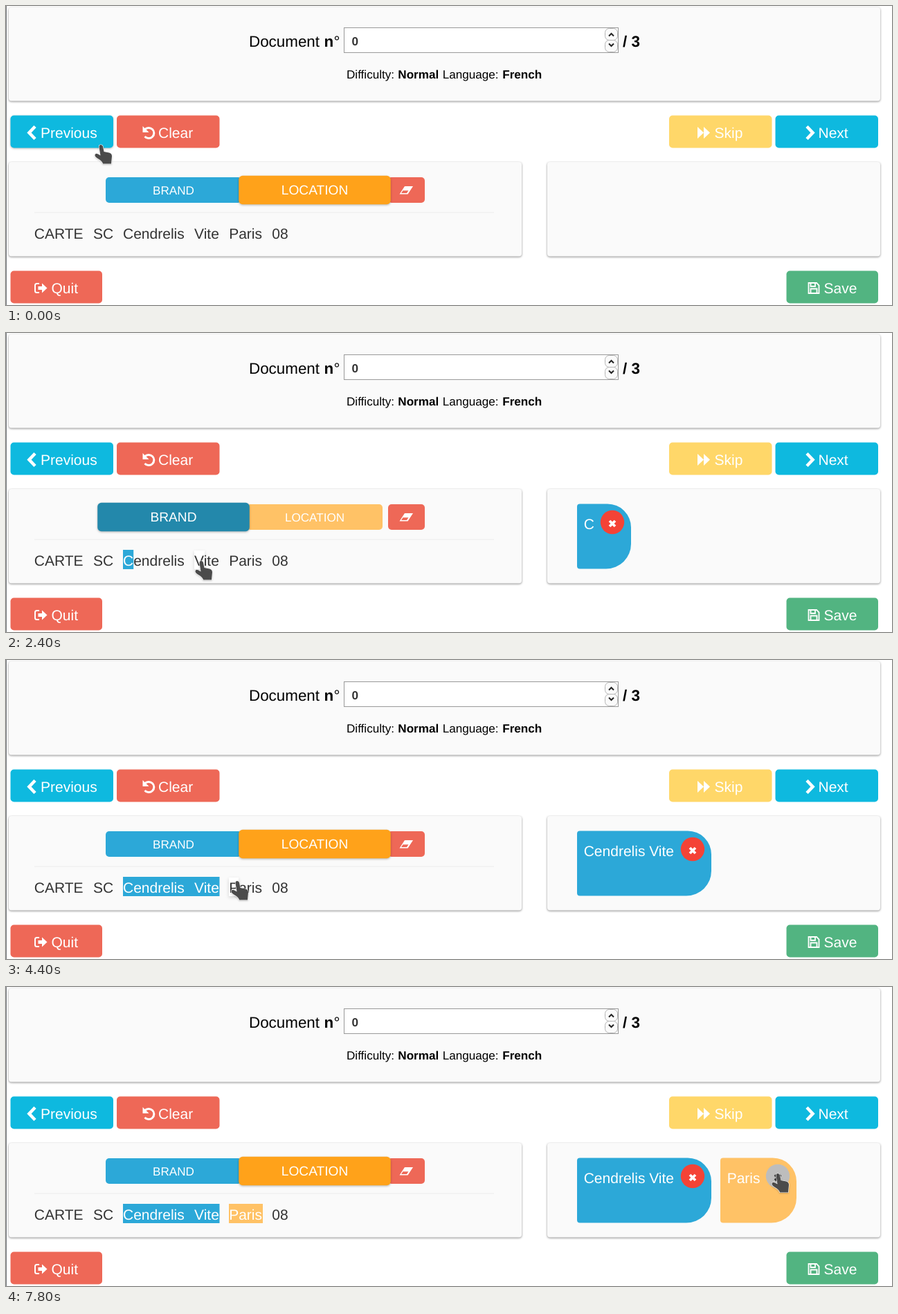
An HTML page that plays this animation: 1280 px wide and 433 px high, repeating every 8 s.

```html
<!DOCTYPE html>
<html lang="en">
<head>
<meta charset="utf-8">
<title>Document labelling</title>
<style>
  html, body { margin: 0; width: 100%; height: 100%; overflow: hidden; background: #fff; }
  svg { display: block; width: 100%; height: 100%; font-family: "Liberation Sans", Arial, sans-serif; }
  text { font-size: 21px; fill: #333; white-space: pre; text-rendering: geometricPrecision; }
  .panel { fill: #fafafa; filter: drop-shadow(0 1.5px 1.5px rgba(0,0,0,.45)); }
  .raised { filter: drop-shadow(0 1px 1.5px rgba(0,0,0,.28)); }
  .hover { fill: #fff; filter: drop-shadow(0 2px 2.5px rgba(0,0,0,.16)); }
  .head text { fill: #000; }
  .title { font-size: 22.4px; }
  .head .small { font-size: 17.1px; }
  .head .value { fill: #333; }
  .b { font-weight: bold; }
  .light text, .light path { fill: #fff; }
  .light .line { fill: none; stroke: #fff; }
  .light .red { fill: #ee6857; }
  .tab { font-size: 17.1px; fill: #fff; text-anchor: middle; }
  .cyan { fill: #0eb9df; }
  .yellow { fill: #ffd769; }
  .green { fill: #52b481; }
  .pointer { fill: #4b4b4b; stroke: #fff; stroke-width: 1.2; paint-order: stroke; stroke-linejoin: round;
    filter: drop-shadow(0 1px 1px rgba(0,0,0,.2)); }
</style>
</head>
<body>
<svg viewBox="0 0 1280 433" preserveAspectRatio="none">
  <rect width="1" height="433" fill="#777b80"/>
  <rect class="panel" x="4" y="2" width="1259" height="135.5" rx="4"/>
  <rect class="panel" x="4" y="226" width="741" height="136.5" rx="4"/>
  <rect class="panel" x="782" y="226" width="481" height="136.5" rx="4"/>

  <g class="head">
    <text class="title" x="351" y="59">Document</text>
    <text class="title b" x="459.6" y="59">n</text>
    <text class="title" x="473.6" y="59">°</text>
    <rect x="488.5" y="31.5" width="396" height="36" fill="#fff" stroke="#999"/>
    <text class="small b value" x="499.5" y="57">0</text>
    <g fill="#fafafa" stroke="#b5b5b5">
      <rect x="865.5" y="32.5" width="18" height="17" rx="6"/>
      <rect x="865.5" y="49.5" width="18" height="17" rx="6"/>
    </g>
    <path d="M871 43.5l3.5-3.5 3.5 3.5M871 54.5l3.5 3.5 3.5-3.5" fill="none" stroke="#222" stroke-width="2"/>
    <text class="title b" x="891" y="59">/ 3</text>
    <text class="small" x="492" y="105">Difficulty:</text>
    <text class="small b" x="566.3" y="105">Normal</text>
    <text class="small" x="630.8" y="105">Language:</text>
    <text class="small b" x="717.2" y="105">French</text>
  </g>

  <g class="light">
    <rect id="previous" class="cyan" x="6.5" y="158.5" width="148.5" height="47" rx="5"/>
    <path class="line" d="M42 174.5l-8.5 9 8.5 9" stroke-width="4.6"/>
    <text x="50" y="190.8">Previous</text>

    <rect class="red" x="160" y="158.5" width="148.5" height="47" rx="5"/>
    <path class="line" d="M200.5 179A7.6 7.6 0 1 1 200.5 189" stroke-width="3"/>
    <path d="M197.5 174v9h9z"/>
    <text x="220" y="190.8">Clear</text>

    <rect class="yellow" x="958" y="158.5" width="148.5" height="47" rx="5"/>
    <path d="M999 175l9 8.5-9 8.5zM1008 175l9 8.5-9 8.5z"/>
    <text x="1023.5" y="190.8">Skip</text>

    <rect class="cyan" x="1111.5" y="158.5" width="148.5" height="47" rx="5"/>
    <path class="line" d="M1157 174.5l8.5 9-8.5 9" stroke-width="4.6"/>
    <text x="1173.5" y="190.8">Next</text>

    <rect class="red" x="6.5" y="383.5" width="132.5" height="47" rx="5"/>
    <path class="line" d="M48 402h-3.5q-2.5 0-2.5 2.5v8q0 2.5 2.5 2.5h3.5" stroke-width="2"/>
    <path d="M46.5 406h5.5v-4.5l7.5 7-7.5 7v-4.5h-5.5z"/>
    <text x="65.5" y="415.8">Quit</text>

    <rect class="green" x="1127.5" y="383.5" width="132.5" height="47" rx="5"/>
    <path class="line" d="M1159.5 401h11.5l3.5 3.5v11.5h-15zM1162.5 415.5v-6h9v6M1162.5 401.5v4.5h6.5v-4.5" stroke-width="1.8"/>
    <text x="1181.5" y="415.8">Save</text>

    <rect class="red" x="552" y="248" width="53" height="37" rx="5"/>
    <path d="M576 261h12l-7.5 11.5h-12z"/>
    <path class="red" d="M573.5 267.2h8l-2.5 3.8h-8z"/>
  </g>

  <g id="tabs"></g>
  <path d="M41 299h664" stroke="#ececec"/>

  <rect id="hover" class="hover" y="315" height="27"/>
  <rect id="markBrand" x="169" y="314" height="28" fill="#2ca8d8"/>
  <rect id="markPlace" x="322" y="314" height="28" fill="#ffc266"/>
  <g id="words"></g>
  <g id="chips"></g>

  <path id="hand" class="pointer" d="M6.5 4Q6.500 1 9 1T12 3.500L13.500 11 21 12.500Q25 13.500 25 17.500L24 28.500H12Q11 24.500 4 20.500 0 18 .5 15.500 1.500 12.500 5 14.500L8.500 16.500Z"/>
  <path id="arrow" class="pointer" d="M1 1V20L5.500 16 9 23.500 12.500 22 9 14.500H15Z"/>
</svg>
<script>
const LOOP = 8000, STEP = 100;
const $ = id => document.getElementById(id);
const SVG = "http://www.w3.org/2000/svg";
const clamp = v => Math.min(1, Math.max(0, v));
const ramp = (t, from, to) => clamp((t - from) / (to - from));
const show = (el, on) => el.setAttribute("visibility", on ? "visible" : "hidden");

function set(el, attrs) {
  for (const k in attrs) el.setAttribute(k, attrs[k]);
  return el;
}
function add(parent, name, attrs = {}, text = "") {
  const el = set(document.createElementNS(SVG, name), attrs);
  el.textContent = text;
  return parent.appendChild(el);
}
function mix(a, b, p) {
  return `rgb(${a.map((v, i) => Math.round(v + (b[i] - v) * p))})`;
}

// Pointer moves: start, end, left, top
const moves = [
  [0, 400, 185, 264], [700, 900, 139, 329], [1200, 1300, 169, 329],
  [1600, 1900, 168, 330], [2100, 2400, 273, 329], [2800, 3100, 291, 332],
  [3500, 3700, 400, 305], [3800, 3900, 439, 279], [3900, 4000, 436, 264],
  [4200, 4400, 325, 319], [4500, 4800, 324, 328], [4900, 5100, 346, 336],
  [5200, 5300, 357, 334], [5700, 5900, 467, 333], [6000, 6200, 849, 350],
  [6400, 6600, 890, 329], [6700, 7000, 1085, 246], [7100, 7300, 1106, 269]
];
function pointerAt(t) {
  let x = 128, y = 200;
  for (const [from, to, nx, ny] of moves) {
    const p = ramp(t, from, to);
    x += (nx - x) * p;
    y += (ny - y) * p;
  }
  return [x, y];
}

// Letter under the pointer: start, end, left, width
const hovers = [
  [900, 1300, 140, 15], [1300, 1400, 155, 13], [1400, 2100, 169, 15],
  [2400, 3000, 272, 15], [3000, 3400, 297, 12], [4400, 5000, 322, 14],
  [5300, 7800, 360, 11]
];

function makeTab(cx, label, idle, active) {
  const g = add($("tabs"), "g");
  const box = add(g, "rect", { x: -98, y: -18.5, width: 196, height: 37, rx: 5 });
  add(g, "text", { class: "tab", y: 6.2 }, label);
  return (p, lifted) => {
    set(g, { transform: `translate(${cx} 266.5) scale(${1 + .12 * p})` });
    set(box, { fill: mix(idle, active, p), class: p > 0 || lifted ? "raised" : "" });
    if (p > .5 && g !== g.parentNode.lastChild) g.parentNode.append(g);
  };
}
const brandTab = makeTab(242, "BRAND", [44, 168, 216], [35, 136, 171]);
const placeTab = makeTab(446, "LOCATION", [255, 194, 102], [255, 162, 26]);

function makeWord(x, word) {
  const el = add($("words"), "text", { x, y: 337 });
  const marked = add(el, "tspan", { fill: "#fff" });
  const plain = add(el, "tspan");
  return n => {
    marked.textContent = word.slice(0, n);
    plain.textContent = word.slice(n);
  };
}
makeWord(40.8, "CARTE")(0);
makeWord(126, "SC")(0);
const shopWord = makeWord(169, "Cendrelis");
const kindWord = makeWord(272, "Vite");
const cityWord = makeWord(322.2, "Paris");
makeWord(384.3, "08")(0);

function makeChip(x, fill) {
  const g = add($("chips"), "g");
  const body = add(g, "path", { fill });
  const label = add(g, "text", { x: x + 9.7, y: 284.2, style: "fill:#fff" });
  const button = add(g, "g");
  const disc = add(button, "circle", { r: 17.2 });
  const cross = add(button, "path", { d: "M-4-2L4 6M4-2L-4 6", "stroke-width": 3.8 });
  return (text, width, dim) => {
    show(g, text);
    if (!text) return;
    const r = x + width;
    set(body, { d: `M${x + 4} 247.5H${r - 34}A34 34 0 0 1 ${r} 281.5V305.5A36 36 0 0 1 ${r - 36} 341.5H${x + 4}Q${x} 341.5 ${x} 337.5V251.5Q${x} 247.5 ${x + 4} 247.5Z` });
    label.textContent = text;
    set(button, { transform: `translate(${r - 27} 274)` });
    set(disc, { fill: dim ? "#bdbdbd" : "#f44336" });
    set(cross, { stroke: dim ? "#333" : "#fff" });
  };
}
const brandChip = makeChip(825, "#2ca8d8");
const placeChip = makeChip(1032, "#ffc266");

function draw(t) {
  $("previous").setAttribute("class", t < 100 ? "cyan raised" : "cyan");

  const brandOn = ramp(t, 300, 600) - ramp(t, 4100, 4400);
  brandTab(brandOn);
  placeTab(1 - brandOn, t >= 3900 && t < 4200);

  const hover = hovers.find(([from, to]) => t >= from && t < to);
  show($("hover"), hover);
  if (hover) set($("hover"), { x: hover[2], width: hover[3] });

  const brandFirst = t >= 2100, brandAll = t >= 3400;
  set($("markBrand"), { width: brandAll ? 139.5 : brandFirst ? 15.2 : 0 });
  shopWord(brandAll ? 9 : +brandFirst);
  kindWord(brandAll ? 4 : 0);
  brandChip(brandAll ? "Cendrelis Vite" : brandFirst ? "C" : "", brandAll ? 194 : 78);

  const placeFirst = t >= 5000, placeAll = t >= 5800;
  set($("markPlace"), { width: placeAll ? 49 : placeFirst ? 14 : 0 });
  cityWord(placeAll ? 5 : +placeFirst);
  placeChip(placeAll ? "Paris" : placeFirst ? "P" : "", placeAll ? 110 : 76.5, t >= 7800);

  const [x, y] = pointerAt(t);
  const isArrow = (t >= 3600 && t < 3900) || (t >= 5800 && t < 7300);
  show($("hand"), !isArrow);
  show($("arrow"), isArrow);
  set(isArrow ? $("arrow") : $("hand"), { transform: `translate(${x} ${y})` });
}

const start = performance.now();
function tick() {
  const t = Math.max(0, performance.now() - start) % LOOP;
  draw(Math.floor(t / STEP) * STEP);
  requestAnimationFrame(tick);
}
tick();
</script>
</body>
</html>
```
